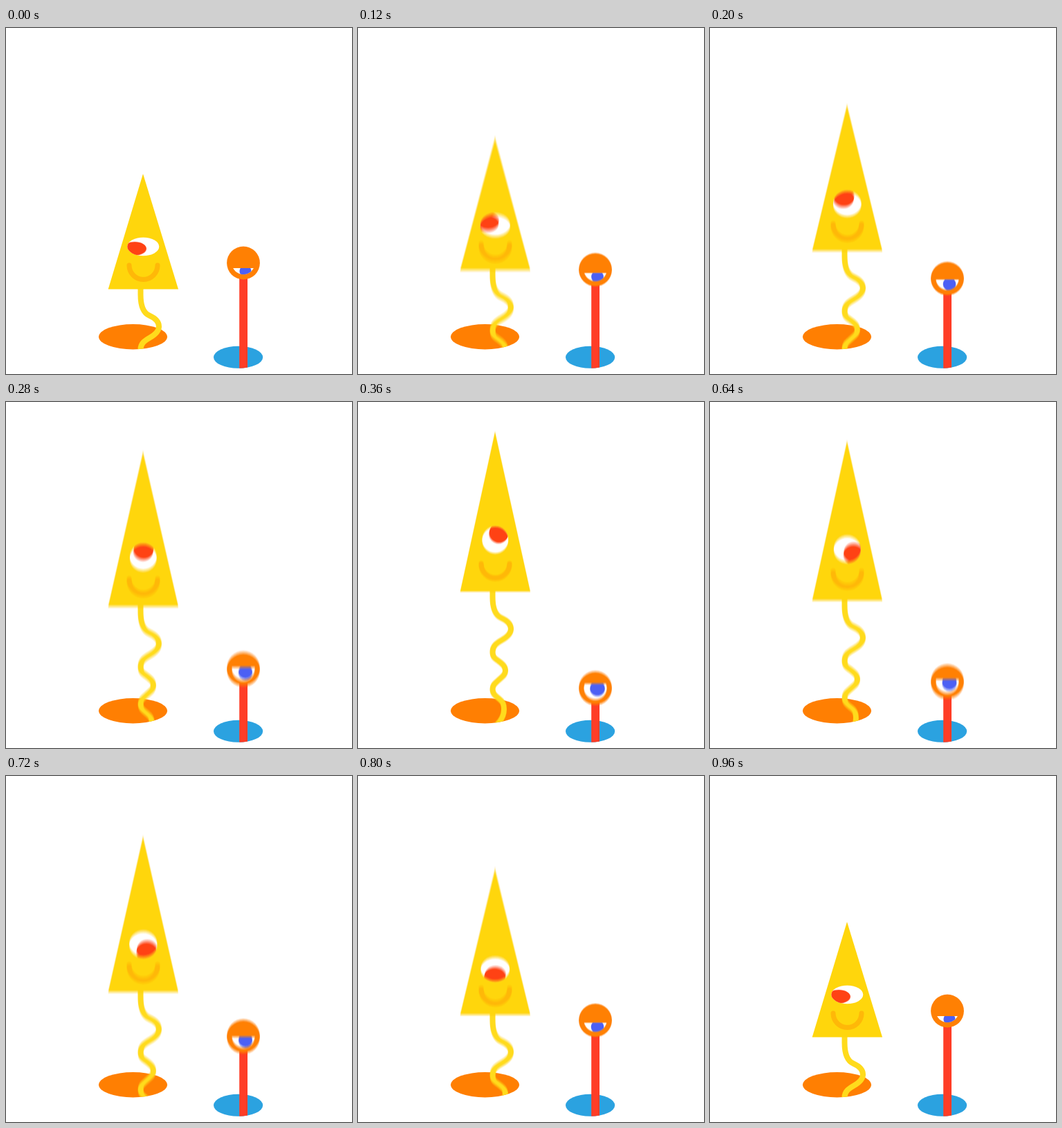
An HTML page with a canvas that plays this animation: 500 by 500 pixels, repeating every 1 s.

```html
<!DOCTYPE html>
<html lang="en">
<head>
<meta charset="utf-8">
<title>Bouncing shapes</title>
<style>
  html, body { margin: 0; width: 100%; height: 100%; overflow: hidden; background: #fff; }
  canvas { display: block; width: 500px; height: 500px; }
</style>
</head>
<body>
<canvas id="stage" width="500" height="500"></canvas>
<script>
const SIZE = 500, LOOP = 1000, STEP = 40, CYCLE = 960;
const SHUTTER = 20, SAMPLES = 12;
const TAU = Math.PI * 2;

const out = document.getElementById('stage').getContext('2d');
const buffer = document.createElement('canvas');
buffer.width = buffer.height = SIZE;
const c = buffer.getContext('2d');

// Smooth periodic track through key values; the curve never overshoots a key.
const TIMES = [0, 200, 360, 480, 520, 720, 800, CYCLE];
function track(...v) {
  const n = v.length - 1;
  const secant = i => (v[i + 1] - v[i]) / (TIMES[i + 1] - TIMES[i]);
  const slope = v.map((_, i) => {
    const a = secant((i + n - 1) % n), b = secant(i % n);
    return a * b > 0 ? 2 * a * b / (a + b) : 0;
  });
  return t => {
    let i = 0;
    while (i < n - 1 && t >= TIMES[i + 1]) i++;
    const h = TIMES[i + 1] - TIMES[i], s = (t - TIMES[i]) / h, r = 1 - s;
    return v[i] * (1 + 2 * s) * r * r + h * slope[i] * s * r * r
         + v[i + 1] * s * s * (3 - 2 * s) - h * slope[i + 1] * s * s * r;
  };
}

const cone = {
  apex:  track(211, 112, 43, 24.5, 27, 88, 135, 211),
  base:  track(377.5, 322, 274, 260.5, 262, 312, 345, 377.5),
  eye:   track(316, 254.5, 199.5, 180, 182, 243, 279, 316),
  rx:    track(23, 20.5, 19, 19, 19, 20.3, 21, 23),
  ry:    track(13.3, 18, 19.3, 19, 19, 18.5, 17, 13.3),
  angle: track(158, 244, 298, 340, 355, 423, 451, 518),
  smile: track(343, 284, 234, 216.5, 218, 274.5, 308, 343)
};
const ball = {
  y:     track(339.5, 362, 413.5, 439.5, 437, 376.5, 353, 339.5),
  lid:   track(7.5, 1.5, -6.5, -9.5, -9, 0.5, 3.5, 7.5),
  pupil: track(12, 8, 0.5, -3.5, -3, 5.5, 9.5, 12),
  r:     track(8.5, 9.3, 10.8, 11, 11, 10, 9.3, 8.5)
};

const TAIL = new Path2D('M194.5-8V8C194.5 24 198 34 207 38S221 47 221 54S215 66 208 70' +
  'S194.5 78 194.5 87S199 97 204 101S213 108 213 114.5S207 124 203 128' +
  'S194.5 134 194.5 141S199 151 204 155S211 162 211 170C211 180 205 188 201 192S195.5 200 195 214');

function oval(x, y, rx, ry = rx) {
  c.beginPath();
  c.ellipse(x, y, rx, ry, 0, 0, TAU);
}

function fillOval(color, ...shape) {
  oval(...shape);
  c.fillStyle = color;
  c.fill();
}

// Hides whatever sinks below the front rim of a hole.
function clipToHole(x, y, rx, ry) {
  oval(x, y, rx, ry);
  c.rect(0, 0, SIZE, y);
  c.clip();
}

function drawCone(t) {
  const hole = [183.5, 446.2, 49.5, 18.2];
  const base = cone.base(t), eye = cone.eye(t), rx = cone.rx(t), ry = cone.ry(t);
  fillOval('#ff7f02', ...hole);

  c.save();
  clipToHole(...hole);
  c.translate(0, base);
  c.strokeStyle = '#ffdb1c';
  c.lineWidth = 8;
  c.stroke(TAIL);
  c.restore();

  c.beginPath();
  c.moveTo(198, cone.apex(t));
  c.lineTo(249, base);
  c.lineTo(147.7, base);
  c.fillStyle = '#ffd60c';
  c.fill();

  c.beginPath();
  c.arc(198.5, cone.smile(t), 20.5, 0, Math.PI);
  c.strokeStyle = '#ffb808';
  c.lineWidth = 7;
  c.lineCap = 'round';
  c.stroke();
  c.lineCap = 'butt';

  c.save();
  fillOval('#fff', 198.3, eye, rx, ry);
  c.clip();
  const a = cone.angle(t) * TAU / 360, sx = rx / 19, sy = ry / 19;
  fillOval('#ff4214', 198.3 + Math.cos(a) * 11 * sx, eye + Math.sin(a) * 11 * sy, 14 * sx, 14 * sy);
  c.restore();
}

function drawBall(t) {
  const hole = [335.6, 475.8, 35.6, 16];
  const y = ball.y(t);
  fillOval('#2ba2e0', ...hole);

  c.save();
  clipToHole(...hole);
  c.fillStyle = '#ff3d26';
  c.fillRect(337.2, y, 11.8, SIZE - y);
  c.restore();

  fillOval('#ff8003', 343, y, 23.9);
  c.save();
  c.beginPath();
  c.rect(300, y + ball.lid(t), 90, 60);
  c.clip();
  fillOval('#fff', 343, y, 16.6);
  c.clip();
  fillOval('#4c60f4', 346, y + ball.pupil(t), ball.r(t));
  c.restore();
}

function drawScene(t) {
  c.fillStyle = '#fff';
  c.fillRect(0, 0, SIZE, SIZE);
  drawCone(t);
  drawBall(t);
}

// Averages several moments around t for motion blur.
function drawBlurred(t) {
  for (let k = 0; k < SAMPLES; k++) {
    const shift = ((k + 0.5) / SAMPLES - 0.5) * SHUTTER;
    drawScene((t + shift + CYCLE) % CYCLE);
    out.globalAlpha = 1 / (k + 1);
    out.drawImage(buffer, 0, 0);
  }
}

let shown = -1;
function tick(now) {
  const step = Math.floor((now % LOOP) / STEP);
  if (step !== shown) {
    shown = step;
    drawBlurred(step * STEP);
  }
  requestAnimationFrame(tick);
}
tick(performance.now());
</script>
</body>
</html>
```
